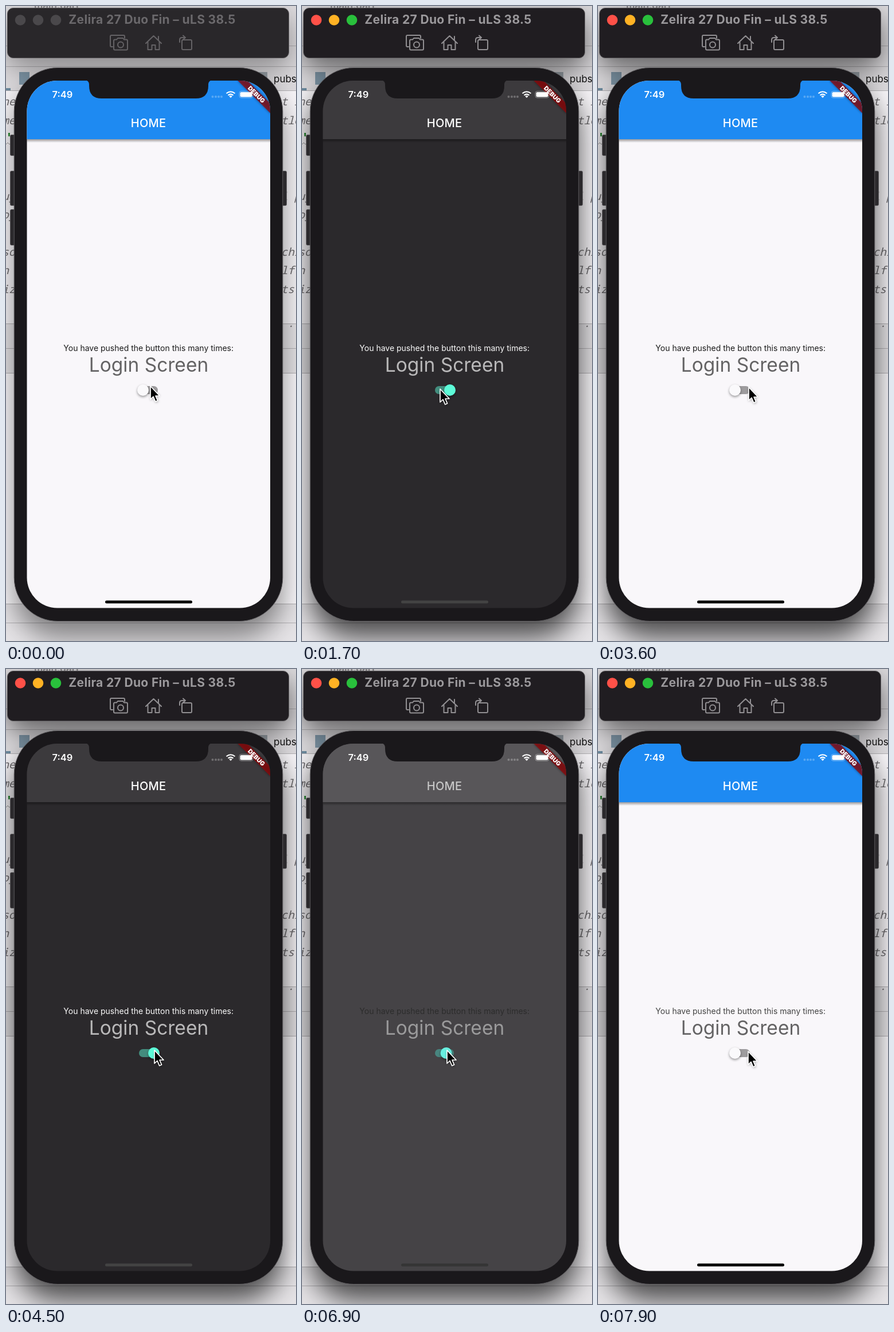
These frames come from a looping animation (506x1106 px, 8000 ms). An HTML page:

```html
<!DOCTYPE html>
<html lang="en">
<head>
<meta charset="utf-8">
<title>Theme switch</title>
<style>
  html, body { margin: 0; width: 100%; height: 100%; overflow: hidden; background: #eeecef; }
  svg { display: block; width: 506px; height: 1106px; font-family: Inter, sans-serif; }
  .code { font: italic 19px "Noto Sans Mono", monospace; fill: #6c6a6d; }
  .mid { text-anchor: middle; }
  .line { fill: none; stroke-width: 2; stroke-linejoin: round; stroke-linecap: round; }
</style>
</head>
<body>
<svg viewBox="0 0 506 1106">
  <defs>
    <filter id="blur" x="-50%" y="-50%" width="200%" height="200%"><feGaussianBlur stdDeviation="24"/></filter>
    <filter id="soft" x="-50%" y="-50%" width="200%" height="200%"><feGaussianBlur stdDeviation="2"/></filter>
    <clipPath id="screen"><rect x="36.500" y="130" width="424.500" height="918.500" rx="53"/></clipPath>
    <linearGradient id="drop" x2="0" y2="1">
      <stop stop-opacity=".38"/><stop offset="1" stop-opacity="0"/>
    </linearGradient>
  </defs>

  <!-- editor behind the phone -->
  <rect width="506" height="147" fill="#dddbde"/>
  <rect y="147" width="506" height="406" fill="#f7f5f8"/>
  <rect y="553" width="506" height="87" fill="#e6e4e7"/>
  <rect y="640" width="506" height="401" fill="#fbf9fc"/>
  <rect y="1041" width="506" height="65" fill="#e6e4e7"/>
  <path d="M0 69.5H506M0 105.5H506M0 147.5H506M0 553.5H506M0 596.5H506M0 639.5H506M0 1041.5H506M0 1074.5H506" stroke="#b2b0b3"/>
  <text x="49" y="5" font-size="17" font-weight="600" fill="#858386">main.dart</text>
  <rect y="143" width="8" height="4" fill="#6d8ca0"/>
  <rect x="23" y="115" width="18" height="22" fill="#8098a9"/>
  <rect x="440" y="115" width="16" height="22" fill="#98a0a7"/>
  <g class="code" id="code"></g>
  <text x="2" y="236" font-size="20" font-weight="700" fill="#168020">'</text>
  <path d="M0 241l3-3 3 3 3-3" fill="none" stroke="#999"/>

  <!-- window shadows -->
  <g id="shade" filter="url(#blur)">
    <rect x="14" y="135" width="469" height="965" rx="76"/>
    <rect x="2" y="20" width="492" height="88" rx="10" opacity=".85"/>
  </g>
  <text x="467" y="133" font-size="17" fill="#111">pubs</text>

  <!-- simulator toolbar -->
  <rect id="bar" x="2.5" y="3.5" width="491" height="87" rx="10" stroke="#5b595c"/>
  <circle class="lamp" cx="25" cy="24.500" r="9.300"/>
  <circle class="lamp" cx="56" cy="24.500" r="9.300"/>
  <circle class="lamp" cx="87" cy="24.500" r="9.300"/>
  <text id="title" class="mid" x="255" y="31" font-size="21" font-weight="700" letter-spacing=".35">Zelira 27 Duo Fin – uLS 38.5</text>
  <g id="icons" class="line">
    <path d="M186 71h-2q-2 0-2-2V53q0-2 2-2h21q2 0 2 2v3M190 58.500h3l2-2.500h9l2 2.500h4q2 0 2 2v14q0 2-2 2h-20q-2 0-2-2v-14q0-2 2-2z"/>
    <circle cx="200" cy="67.500" r="5"/>
    <path d="M244 65l13.500-13 13.500 13M247.500 63v13h7v-8h6v8h7V63M266 59v-6"/>
    <rect x="307" y="59" width="17" height="17" rx="2"/>
    <path d="M303 63v-4q0-4 4-4h5M309 51.500l4 3.500-4 3.500"/>
  </g>

  <!-- phone body -->
  <g fill="#2b292c" stroke="#555356">
    <rect x="7.500" y="224.500" width="9" height="36" rx="2"/>
    <rect x="7.500" y="287.500" width="9" height="60" rx="2"/>
    <rect x="7.500" y="354.500" width="9" height="62" rx="2"/>
    <rect x="480.500" y="287.500" width="9" height="60" rx="2"/>
  </g>
  <rect x="14.200" y="107.500" width="468.600" height="964" rx="76" fill="#1a181b" stroke="#5f5d60"/>

  <!-- app -->
  <g clip-path="url(#screen)">
    <rect id="page" x="36" y="130" width="426" height="919"/>
    <rect x="36" y="232" width="426" height="6" fill="url(#drop)"/>
    <rect id="head" x="36" y="130" width="426" height="102"/>
    <text id="home" class="mid" x="248.500" y="211" font-size="20" font-weight="500" letter-spacing=".2">HOME</text>
    <!-- corner ribbon -->
    <g transform="translate(461 130) rotate(45)">
      <rect x="-40" y="28" width="80" height="12" opacity=".45" filter="url(#soft)"/>
      <rect x="-40" y="28" width="80" height="12" fill="#960508" fill-opacity=".72"/>
      <text class="mid" y="37.800" font-size="10.600" font-weight="900" fill="#fff">DEBUG</text>
    </g>
    <path d="M138 129Q145 130 145 137V139Q145 161 167 161H331Q353 161 353 139V137Q353 130 360 129z" fill="#1a181b"/>
  </g>
  <text x="80.500" y="160" font-size="16.500" font-weight="600" fill="#fff">7:49</text>
  <g fill="#fff">
    <g opacity=".26">
      <circle cx="360.500" cy="158" r="2"/><circle cx="366" cy="158" r="2"/>
      <circle cx="371" cy="158" r="2"/><circle cx="376" cy="158" r="2"/>
    </g>
    <path d="M392 160l-2.700-2.800q2.700-2.300 5.400 0z"/>
    <g class="line" stroke="#fff" style="stroke-linecap:butt">
      <path d="M387.500 155.500q4.500-3.800 9 0M384.500 152.300q7.500-6.200 15 0"/>
    </g>
    <rect x="407" y="148.500" width="24" height="11.500" rx="3.500" fill="none" stroke="#fff" opacity=".4"/>
    <rect x="408.500" y="150" width="21" height="8.500" rx="2.200"/>
  </g>
  <text id="note" class="mid" x="248.700" y="601" font-size="14">You have pushed the button this many times:</text>
  <text id="login" class="mid" x="249" y="637" font-size="33.500">Login Screen</text>
  <rect id="track" x="232" y="662" width="33" height="14" rx="7"/>
  <g id="thumb">
    <circle cy="671" r="10" opacity=".4" filter="url(#soft)"/>
    <circle id="knob" cy="669" r="10"/>
  </g>
  <rect id="pill" x="173" y="1035.500" width="152" height="5" rx="2.500"/>

  <g id="arrow">
    <path d="M0 1V25L6 20 9 29 14 27 10 18H17z" opacity=".35" filter="url(#soft)"/>
    <path d="M0 0V23L5 18.300 8.700 27 12.600 25.300 9 17H16z" stroke="#fff" stroke-width="1.700" stroke-linejoin="round"/>
  </g>
</svg>
<script>
const $ = id => document.getElementById(id);
const clamp = v => Math.min(1, Math.max(0, v));
const mix = (a, b, k) => a + (b - a) * k;
const blend = (a, b, k) => a.map((v, i) => mix(v, b[i], k));
const rgb = (c, alpha = 1) => `rgba(${c.map(Math.round)},${alpha})`;
const gray = (v, alpha) => rgb([v, v, v], alpha);
const fill = (id, color) => $(id).setAttribute('fill', color);

const LOOP = 8000, STEP = 100, FADE = 200, FOCUS = 400;
const clicks = [500, 2300, 4000, 5827, 6743, 7563];  // dark, light, dark, ...
const path = [  // time, x, y of the pointer tip
  [0, 252, 662], [700, 252, 662], [1600, 241, 667], [2500, 241, 667],
  [3300, 263, 664], [4100, 263, 664], [4500, 259, 664], [4900, 259, 664],
  [5700, 243, 665], [6100, 243, 665], [6650, 253, 664], [6900, 253, 664],
  [7450, 262, 666], [LOOP, 262, 666]
];
const lampColors = ['#ff5148', '#ffb224', '#29c03c'];
const blue = [30, 138, 242], teal = [93, 251, 216], white = [250, 249, 251];

// code lines: baseline, left piece, right piece
[[173, 'ne', 't r'], [206, 'me', 'tle'], [338, 'ug', 'l p'], [370, 'oj', ''],
 [435, 'so', 'chi'], [467, 'n', 'lf'], [500, 'iz', 'ts'], [559, '', ' .']].forEach(([y, left, right]) => {
  const put = (x, s) => $('code').insertAdjacentHTML('beforeend', `<text x="${x}" y="${y}" xml:space="preserve">${s}</text>`);
  put(-6.6, left);
  put(480, right);
});

function pointer(t) {
  const i = path.findIndex(p => p[0] > t);
  const [a, b] = [path[i - 1], path[i]];
  const k = (t - a[0]) / (b[0] - a[0]);
  return blend(a, b, k * k * (3 - 2 * k)).slice(1);
}

function draw(t) {
  const active = t >= FOCUS;
  $('shade').setAttribute('opacity', active ? .68 : .45);
  fill('bar', active ? '#201d21' : '#29272a');
  fill('title', active ? '#9b999c' : '#6b696c');
  $('icons').setAttribute('stroke', active ? '#918f92' : '#646265');
  document.querySelectorAll('.lamp').forEach((e, i) => e.setAttribute('fill', active ? lampColors[i] : '#4a484b'));

  const done = clicks.filter(c => c <= t).length;
  const age = done ? t - clicks[done - 1] : LOOP;
  const toward = k => done % 2 ? 1 - k : k;  // 0 dark, 1 light
  const p = clamp(age / FADE);
  const light = toward(p);
  const on = 1 - toward(p ** 1.7);
  const late = toward(clamp((age - 140) / 240));

  fill('page', rgb(blend([43, 41, 44], [249, 247, 250], light ** 1.35)));
  fill('head', rgb(light < .5 ? [60, 58, 61].map(v => v + 130 * light) : blend([33, 33, 33], blue, light)));
  // the finished light bar carries white lettering
  fill('home', light === 1 ? '#fff' : gray(255 * (1 - light), 1 - .05 * light));
  fill('login', gray(255 * (1 - light), mix(.67, .6, light)));
  fill('note', gray(mix(250, 28, late)));
  fill('pill', gray(67 * (1 - light)));

  const accent = blend(teal, blue, light * .6), tint = on ** .3;
  fill('knob', rgb(blend(white, accent, tint)));
  fill('track', rgb(blend([0, 0, 0], accent, tint), mix(.37, .48, tint)));
  $('thumb').setAttribute('transform', `translate(${mix(239, 258, on)} 0)`);
  $('arrow').setAttribute('transform', `translate(${pointer(t)})`);
}

function tick() {
  const t = performance.now() % LOOP;
  draw(Math.floor(t / STEP) * STEP);
  requestAnimationFrame(tick);
}
tick();
</script>
</body>
</html>
```
